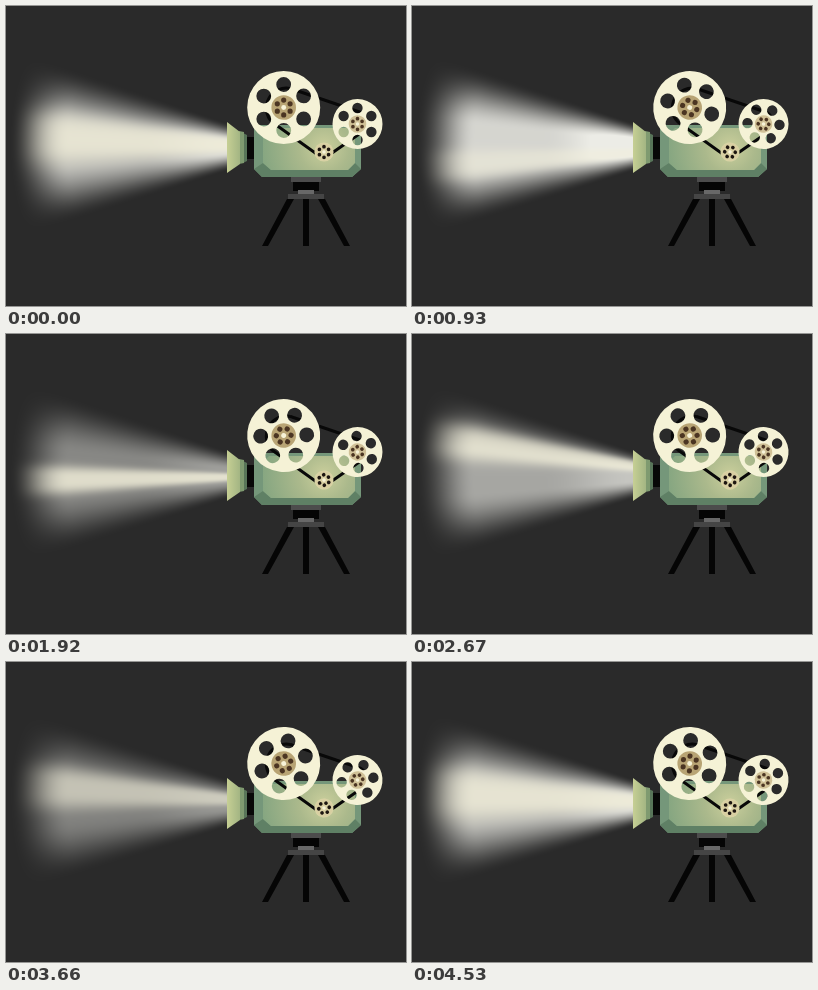
Animation, 400 px wide and 300 px high, one loop 4.56 s. Source, as an HTML page with a canvas:

```html
<!DOCTYPE html>
<html lang="en">
<head>
<meta charset="utf-8">
<title>Film projector</title>
<style>
  html, body { margin: 0; width: 100%; height: 100%; overflow: hidden; background: #2a2a2a; }
  #stage { position: relative; width: 400px; height: 300px; overflow: hidden; }
  canvas, svg { position: absolute; left: 0; top: 0; display: block; }
</style>
</head>
<body>
<div id="stage">
  <canvas id="beam" width="222" height="300"></canvas>
  <svg width="400" height="300" viewBox="0 0 400 300">
    <defs>
      <radialGradient id="shine" gradientUnits="userSpaceOnUse" cx="318" cy="142" r="62">
        <stop offset="0" stop-color="#cbcf9c"/>
        <stop offset=".4" stop-color="#abb98c"/>
        <stop offset="1" stop-color="#86a681"/>
      </radialGradient>
      <linearGradient id="cone" x1="0" x2="1" y1="0" y2="0">
        <stop offset="0" stop-color="#c6cf94"/>
        <stop offset="1" stop-color="#a3b583"/>
      </linearGradient>
    </defs>

    <!-- tripod -->
    <path d="M281 193h7L262 240h-6zM297 193h6v47h-6zM312 193h7L344 240h-6z" fill="#050505"/>
    <path d="M285 171h30v5h-30z" fill="#4c4c4c"/>
    <path d="M287 176h26v9h-26z" fill="#050505"/>
    <path d="M292 184h16v4h-16z" fill="#686868"/>
    <path d="M282 188h36v5h-36z" fill="#454545"/>

    <!-- lens -->
    <path d="M240 131h9v22h-9z" fill="#080808"/>
    <path d="M237 127l4 2v26l-4 2z" fill="#587559"/>
    <path d="M233 125l5 1v31l-5 1z" fill="#7f9a70"/>
    <path d="M221 116l13 10v32l-13 9z" fill="url(#cone)"/>

    <!-- body -->
    <path d="M248 119h101l6 6v38l-9 8h-90l-8-8z" fill="#75977a"/>
    <path d="M257 157l8 7h77l7-7 6 6-9 8h-90l-8-8z" fill="#5f8065"/>
    <path d="M263 122h80l6 6v29l-7 7h-77l-8-7v-29z" fill="url(#shine)"/>

    <path d="M284.5 82.5L355 106.5A13 13 0 0 1 359 124L326 147Q318 153 310 147.5L266 116A20 20 0 0 1 284.5 82.5"
          fill="none" stroke="#080808" stroke-width="3" stroke-linejoin="round"/>
    <g id="reels"></g>
  </svg>
</div>
<script>
const LOOP = 4560;
const BG = 42, WHITE = [236, 236, 230], CREAM = [242, 239, 218];
const W = 222, TOP = 40, H = 200;

// A cream ray sways inside a white haze; "at" and "wide" are fractions of the half beam.
const POSES = [
  { t: 0,    at: -.08, wide: .34, ray: .80, haze: .72 },
  { t: 930,  at: .25,  wide: .20, ray: .50, haze: .88 },
  { t: 1920, at: .09,  wide: .18, ray: .82, haze: .48 },
  { t: 2670, at: -.38, wide: .24, ray: .80, haze: .64 },
  { t: 3300, at: -.27, wide: .32, ray: .50, haze: .38 },
  { t: 4080, at: -.03, wide: .22, ray: .72, haze: .52 }
];

const smooth = v => { v = Math.max(0, Math.min(1, v)); return v * v * (3 - 2 * v); };

function dots(n, ring, r) {
  let d = "";
  for (let i = 0; i < n; i++) {
    const a = i * 2 * Math.PI / n - Math.PI / 2;
    const x = ring * Math.cos(a), y = ring * Math.sin(a);
    d += `M${x - r} ${y}a${r} ${r} 0 1 0 ${2 * r} 0a${r} ${r} 0 1 0 ${-2 * r} 0z`;
  }
  return d;
}

const disc = (r, fill) => `<circle r="${r}" fill="${fill}"/>`;
const hub = (r, fill, dark) => disc(r, fill) +
  `<path d="${dots(6, r * .6, r * .21)}" fill="${dark}"/>` + disc(r * .2, "#f7f3d8");
const wheel = (r, ring, hole) =>
  `<path fill-rule="evenodd" fill="#f5f2d6" d="${dots(1, 0, r)}${dots(6, ring, hole)}"/>`;

const reels = [
  { x: 277.7, y: 101.5, turns: 1, art: wheel(36.5, 23, 7.4) + hub(12.3, "#b8a474", "#4b3522") },
  { x: 351.5, y: 118, turns: 2, art: wheel(25, 16, 5.2) + hub(8.8, "#d0c197", "#4b3522") },
  { x: 318, y: 146, turns: 2, art: disc(9.6, "#d9d4a6") + hub(8.8, "#d9cfa2", "#1d1611") }
];
const holder = document.getElementById("reels");
holder.innerHTML = reels.map(r => `<g>${r.art}</g>`).join("");
reels.forEach((r, i) => { r.node = holder.children[i]; });

const ctx = document.getElementById("beam").getContext("2d");
const image = ctx.createImageData(W, H);

function poseAt(t) {
  const i = POSES.findLastIndex(p => p.t <= t);
  const a = POSES[i], b = POSES[i + 1] || { ...POSES[0], t: LOOP };
  const k = smooth((t - a.t) / (b.t - a.t));
  const mix = key => a[key] + (b[key] - a[key]) * k;
  return { at: mix("at"), wide: mix("wide"), ray: mix("ray"), haze: mix("haze") };
}

function drawBeam(t) {
  const p = poseAt(t), px = image.data;
  for (let x = 0; x < W; x++) {
    const far = (221 - x) / 191;
    const half = 24 + 64 * far, mid = 141 - 2.5 * far;
    const boost = 1 + .25 * smooth((x - 130) / 91);
    for (let y = 0; y < H; y++) {
      const u = (y + TOP + .5 - mid) / half;
      const edge = smooth((1 - Math.abs(u)) / .75);
      const fade = smooth((x - 3 - 15 * u * u) / 60);
      const haze = Math.min(1, p.haze * edge * boost) * fade;
      const ray = p.ray * Math.exp(-(Math.abs((u - p.at) / p.wide) ** 3)) * Math.sqrt(edge) * fade;
      const o = (y * W + x) * 4;
      for (let c = 0; c < 3; c++) {
        const base = BG + haze * (WHITE[c] - BG);
        px[o + c] = base + ray * (CREAM[c] - base);
      }
      px[o + 3] = 255;
    }
  }
  ctx.putImageData(image, 0, TOP);
}

function draw(now) {
  const t = now % LOOP;
  drawBeam(t);
  for (const { x, y, turns, node } of reels)
    node.setAttribute("transform", `translate(${x} ${y}) rotate(${-360 * turns * t / LOOP})`);
}

const start = performance.now();
function tick() {
  draw(performance.now() - start);
  requestAnimationFrame(tick);
}
tick();
</script>
</body>
</html>
```
